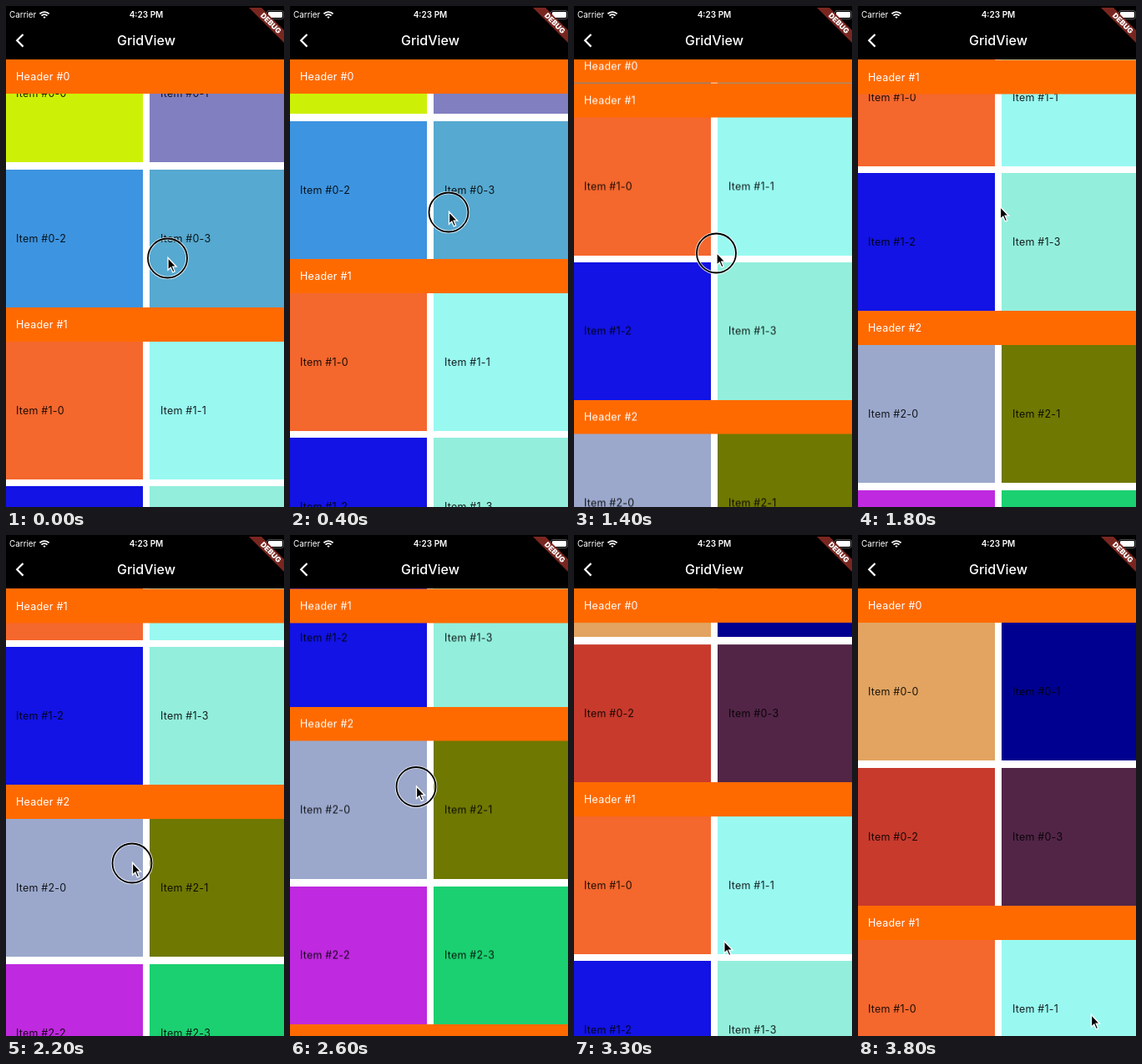
An HTML page for the animation above (3900 ms loop, 333 by 600 pixels).

```html
<!DOCTYPE html>
<html lang="en">
<head>
<meta charset="utf-8">
<title>GridView</title>
<style>
  html, body { margin: 0; width: 100%; height: 100%; overflow: hidden; background: #fff; }
  #stage { position: relative; width: 333px; height: 600px; overflow: hidden; font: 12.5px Inter, sans-serif; }
  #view { position: absolute; inset: 64px 0 0; overflow: hidden; }
  #list { position: absolute; top: 0; left: 0; width: 336px; will-change: transform; }
  .head, .item { position: absolute; box-sizing: border-box; padding-left: 12px; letter-spacing: .22px; white-space: pre; }
  .head { width: 336px; height: 41px; line-height: 41px; background: #ff6a00; color: #fff; z-index: 1; }
  .item { width: 164px; height: 165px; line-height: 165px; color: rgba(0, 0, 0, .87); }
  .item.right { padding-left: 13px; }
  svg { position: absolute; top: 0; left: 0; overflow: hidden; }
  text { fill: #fff; font-family: Inter, sans-serif; }
</style>
</head>
<body>
<div id="stage">
  <div id="view"><div id="list"></div></div>
  <svg width="333" height="600" viewBox="0 0 333 600">
    <rect width="333" height="64"/>
    <text x="4" y="14" font-size="9.9">Carrier</text>
    <text x="168" y="14" font-size="10" font-weight="600" text-anchor="middle">4:23 PM</text>
    <g fill="none" stroke="#fff" stroke-width="1.9">
      <path d="M40.4 9.4a8 8 0 0 1 11.2 0M42.5 11.6a5 5 0 0 1 7 0"/>
      <path d="M44.4 13.2L46 14.9L47.6 13.2a2.3 2.3 0 0 0-3.2 0z" fill="#fff" stroke="none"/>
      <path d="M20.5 34L13.2 41.3L20.5 48.6" stroke-width="2.2"/>
    </g>
    <text x="168" y="47.3" font-size="16" font-weight="500" text-anchor="middle">GridView</text>
    <rect x="312.5" y="5.5" width="20" height="10" rx="2.6" fill="none" stroke="#666" stroke-width=".8"/>
    <rect x="314" y="7" width="17" height="7" rx="1.4" fill="#fff"/>
    <path d="M291 2H306L333 29V44Z" fill="#7a2620"/>
    <text transform="translate(317.4 20.6) rotate(45)" y="3.2" font-size="8.8" font-weight="900" text-anchor="middle">DEBUG</text>
    <g id="pointer">
      <g id="ring" fill="none">
        <circle cy="1" r="23.5" stroke="#fff" stroke-opacity=".8" stroke-width="3.6"/>
        <circle cy="1" r="23.5" stroke="#000" stroke-width="1.8"/>
      </g>
      <path d="M.5 .5V15.2L3.8 12.1L6.3 17.8L8.6 16.8L6.2 11.2H10.6Z" stroke="#fff" stroke-width="1.3"/>
    </g>
  </svg>
</div>
<script>
const LOOP = 3900, STEP = 100;
const HEAD = 41, CELL = 165, GAP = 8.5, RIGHT = 172;
const SECTION = HEAD + 2 * CELL + GAP;
const REBUILD = 2500; // first section gets new colours after leaving the cache

const colors = [
  ['#cdf106', '#817fc0', '#3d94e0', '#56a9d0'],
  ['#f4672d', '#99f9f1', '#1213e4', '#93efdc'],
  ['#9ba8cc', '#6f7800', '#bf29df', '#1bd070'],
  ['#d8c24a', '#4a7f9c', '#a04060', '#60b050']
];
const rebuilt = ['#e2a460', '#000090', '#c83a2c', '#522547'];

// time, scroll offset, pointer x, pointer y
const keys = [
  [0, 83, 193.5, 301], [400, 141, 190, 246], [600, 190, 187, 203],
  [700, 214, 185, 200], [900, 255, 172, 330], [1000, 267, 166, 370],
  [1400, 351.5, 170.5, 295], [1700, 425, 172, 225], [1800, 458, 170, 240],
  [2000, 505, 158, 350], [2200, 524, 151, 392], [2500, 642, 152, 276],
  [2700, 593, 150, 325], [2900, 473, 146, 445], [3000, 373.5, 144.5, 455]
];
const presses = [[0, 600], [1000, 1700], [2100, 2900]];

const $ = id => document.getElementById(id);
const list = $('list'), pointer = $('pointer'), ring = $('ring');
const clamp = (v, lo, hi) => Math.min(hi, Math.max(lo, v));

function add(cls, text, x, y, color) {
  const el = document.createElement('div');
  el.className = cls;
  el.textContent = text;
  el.style.left = x + 'px';
  el.style.top = y + 'px';
  if (color) el.style.background = color;
  return list.appendChild(el);
}

const heads = [], firstItems = [];
colors.forEach((row, i) => {
  const top = i * SECTION;
  heads.push(add('head', `Header #${i}`, 0, top));
  row.forEach((color, j) => {
    const y = top + HEAD + (j >> 1) * (CELL + GAP);
    const el = add(j % 2 ? 'item right' : 'item', `Item #${i}-${j}`, j % 2 ? RIGHT : 0, y, color);
    if (!i) firstItems.push(el);
  });
});

function pose(t) {
  const last = keys[keys.length - 1];
  if (t >= last[0]) {
    // fling decays back to the top while the pointer moves away
    const s = (t - last[0]) / 1000;
    const k = clamp((s - .1) / .6, 0, 1), e = k * k * (3 - 2 * k);
    return [Math.max(0, last[1] - 500 * (1 - Math.exp(-2 * s))), last[2] + 134.5 * e, last[3] + 119 * e];
  }
  const n = keys.findIndex(k => k[0] > t);
  const a = keys[n - 1], b = keys[n], f = (t - a[0]) / (b[0] - a[0]);
  return [1, 2, 3].map(i => a[i] + (b[i] - a[i]) * f);
}

function draw(t) {
  const [scroll, x, y] = pose(t);
  list.style.transform = `translateY(${-scroll}px)`;
  heads.forEach((h, i) => {
    h.style.transform = `translateY(${clamp(scroll - i * SECTION, 0, SECTION - HEAD)}px)`;
  });
  firstItems.forEach((el, j) => {
    el.style.background = (t < REBUILD ? colors[0] : rebuilt)[j];
  });
  pointer.setAttribute('transform', `translate(${x} ${y})`);
  ring.style.display = presses.some(([a, b]) => t >= a && t <= b) ? '' : 'none';
}

const start = performance.now();
function tick() {
  const t = (performance.now() - start) % LOOP;
  draw(Math.floor(t / STEP) * STEP);
  requestAnimationFrame(tick);
}
tick();
</script>
</body>
</html>
```
